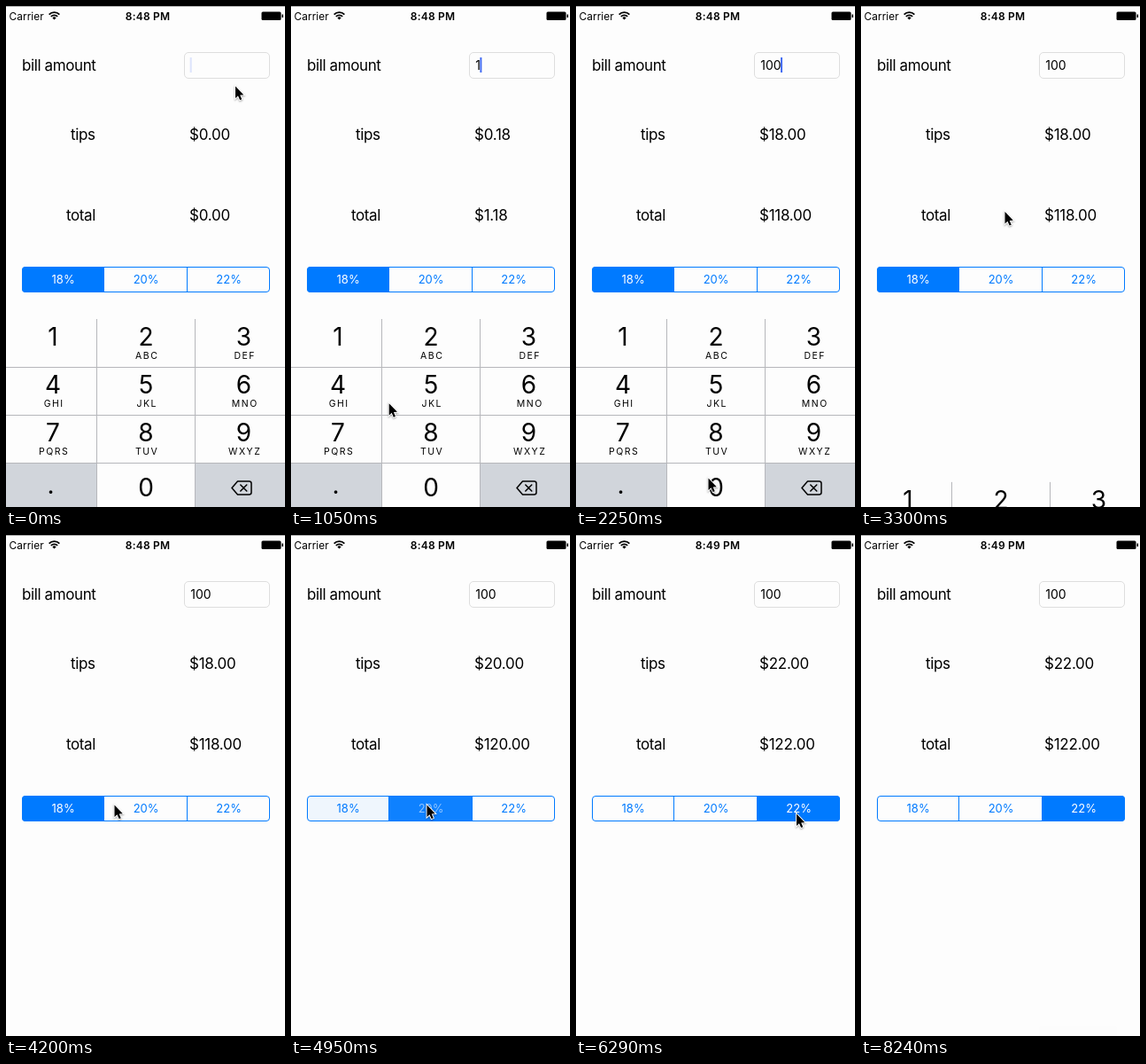
An HTML page with a canvas that plays this animation: 315x565 px, repeating every 8.38 s.

```html
<!DOCTYPE html>
<html lang="en">
<head>
<meta charset="utf-8">
<title>Tip calculator</title>
<style>
  html, body { margin: 0; width: 315px; height: 565px; overflow: hidden; background: #fdfdfd; }
  canvas { display: block; }
</style>
</head>
<body>
<canvas id="stage" width="315" height="565"></canvas>
<script>
const ctx = document.getElementById('stage').getContext('2d');
const LOOP = 8380, STEP = 150;
const PAPER = '#fdfdfd', BLUE = '#007aff', GREY = '#d1d5db';

// Pointer moves: start, end, destination
const MOVES = [
  [0, 750, 80, 382], [900, 1500, 149, 532], [2250, 3000, 162, 231.5], [3300, 4200, 122, 304],
  [4200, 4500, 153, 304], [5100, 5700, 248.5, 314], [6290, 7040, 250.5, 328], [7040, 7490, 262, 600]
];
// Key presses: key, down, up
const PRESSES = [['1', 750, 900], ['0', 1650, 1800], ['0', 2100, 2250]];
// When each segment starts to be selected
const PICKS = [-LOOP, 4650, 5850];
const KEYS = ['1', '2ABC', '3DEF', '4GHI', '5JKL', '6MNO', '7PQRS', '8TUV', '9WXYZ', '.', '0', '<'];
const COLUMNS = [[0, 102, 53], [103, 110, 158], [214, 110, 268.5]];

const ramp = (t, from, to) => Math.min(1, Math.max(0, (t - from) / (to - from)));
const easeOut = (u, power = 2) => 1 - (1 - u) ** power;
const smooth = u => u * u * (3 - 2 * u);

function text(str, x, y, size, { gap = 0, weight = 400, align = 'left', color = '#000' } = {}) {
  ctx.font = `${weight} ${size}px Inter, sans-serif`;
  ctx.letterSpacing = gap + 'px';
  ctx.textAlign = align;
  ctx.fillStyle = color;
  ctx.fillText(str, x, y);
}

function box(color, x, y, w, h) {
  ctx.fillStyle = color;
  ctx.fillRect(x, y, w, h);
}

function round(x, y, w, h, r) {
  ctx.beginPath();
  ctx.roundRect(x, y, w, h, r);
}

function fill(color) {
  ctx.fillStyle = color;
  ctx.fill();
}

function stroke(color, width) {
  ctx.strokeStyle = color;
  ctx.lineWidth = width;
  ctx.stroke();
}

function faded(alpha, paint) {
  ctx.globalAlpha = alpha;
  paint();
  ctx.globalAlpha = 1;
}

function statusBar(t) {
  box('#b0b0b0', 0, 0, 315, 1);
  text('Carrier', 3.5, 15.5, 11.8, { gap: .1 });
  text(t < 5250 ? '8:48 PM' : '8:49 PM', 160, 15.5, 12, { gap: .2, weight: 600, align: 'center' });
  const from = -Math.PI * .75, to = -Math.PI * .25;
  for (const r of [8.3, 5.2]) {
    ctx.beginPath();
    ctx.arc(54.5, 15.5, r, from, to);
    stroke('#000', 1.8);
  }
  ctx.beginPath();
  ctx.moveTo(54.5, 15.5);
  ctx.arc(54.5, 15.5, 3, from, to);
  fill('#000');
  round(288.5, 6.5, 22, 9.5, 1.5);
  fill('#000');
  box('#000', 311.5, 9.5, 1.5, 3.5);
}

function form(t) {
  const bill = PRESSES.filter(p => t >= p[2]).map(p => p[0]).join('');
  const rate = 16 + 2 * PICKS.filter(p => t >= p + 300).length;
  const tip = bill * rate / 100;
  const label = { gap: -.4 }, amount = { gap: -.25 };
  text('bill amount', 18, 73, 17, label);
  text('tips', 73, 151, 17, label);
  text('total', 68, 242, 17, label);
  text('$' + tip.toFixed(2), 207, 151, 17, amount);
  text('$' + (tip + +bill).toFixed(2), 207, 242, 17, amount);

  round(201.5, 52.5, 96, 29, 4.5);
  stroke('#dedede', 1);
  text(bill, 208.2, 72, 14);
  const blink = Math.min(1, ((t - 250) / 600) ** 2) * (1 - ramp(t, 2700, 3000));
  const caret = 207.7 + ctx.measureText(bill).width;
  faded(blink, () => box('#426bf2', caret, 58, 2, 17));
}

function segments(t) {
  const picked = i => i < PICKS.length ? smooth(ramp(t, PICKS[i], PICKS[i] + 350)) : 0;
  ctx.save();
  round(18, 294, 280, 29, 4);
  ctx.clip();
  PICKS.forEach((_, i) => {
    const on = picked(i) - picked(i + 1);
    const x = Math.floor(17.2 + 93.4 * i);
    const label = color => text(18 + 2 * i + '%', 64.6 + 93.5 * i, 313, 13, { align: 'center', color });
    faded(on, () => box(BLUE, x, 294, 94, 29));
    box(BLUE, x, 294, 1, 29);
    label(BLUE);
    faded(on ** 10, () => label('#fff'));
  });
  ctx.restore();
  round(18.5, 294.5, 279, 28, 3.5);
  stroke(BLUE, 1);
}

function backspace() {
  ctx.lineJoin = ctx.lineCap = 'round';
  ctx.beginPath();
  ctx.moveTo(255, 543.5);
  ctx.lineTo(261.5, 536);
  ctx.arcTo(277, 536, 277, 543, 2.5);
  ctx.arcTo(277, 551, 270, 551, 2.5);
  ctx.lineTo(261.5, 551);
  ctx.closePath();
  ctx.moveTo(264.8, 540);
  ctx.lineTo(271.8, 547);
  ctx.moveTo(271.8, 540);
  ctx.lineTo(264.8, 547);
  stroke('#000', 1.5);
}

function keyboard(t) {
  const pressed = PRESSES.find(p => t >= p[1] && t < p[2]);
  ctx.save();
  ctx.translate(0, 216 * easeOut(ramp(t, 3150, 3600), 4.7));
  box(PAPER, 0, 352, 315, 213);
  KEYS.forEach((key, i) => {
    const [x, w, mid] = COLUMNS[i % 3], y = 353 + 54 * Math.floor(i / 3);
    const digit = key[0], drop = { '.': 34.5, '0': 38 }[digit] || 30;
    if ('.<'.includes(key) || (pressed && pressed[0] === digit)) box(GREY, x, y, w, 55);
    if (key === '<') return backspace();
    text(digit, key === '.' ? 50.5 : mid, y + drop, 28, { align: 'center' });
    text(key.slice(1), mid + 1.2, y + 45, 10.5, { gap: 1.5, align: 'center' });
  });
  for (const x of [102, 213]) box('#b6b7bb', x, 353, 1, 220);
  for (const y of [407, 461, 515]) box('#b6b7bb', 0, y, 315, 1);
  ctx.restore();
}

function dockLabel(t) {
  round(201, 554, 88, 24, 3);
  faded(ramp(t, 7340, 7490) - ramp(t, 7940, 8260), () => fill('#e8e8e8'));
}

function pointer(t) {
  let x = 258.5, y = 90;
  for (const [start, end, toX, toY] of MOVES) {
    const u = easeOut(ramp(t, start, end));
    x += (toX - x) * u;
    y += (toY - y) * u;
  }
  ctx.save();
  ctx.translate(x + .5, y + .5);
  ctx.scale(.93, .95);
  ctx.beginPath();
  for (const p of [[0, 0], [0, 14.3], [3.2, 11.3], [5.5, 16.4], [7.8, 15.4], [5.6, 10.4], [10, 10.2]]) ctx.lineTo(...p);
  ctx.closePath();
  ctx.shadowColor = 'rgba(0,0,0,.35)';
  ctx.shadowBlur = 2;
  ctx.shadowOffsetY = 1;
  stroke('#fff', 2);
  ctx.shadowColor = 'transparent';
  fill('#000');
  ctx.restore();
}

// The picture moves in steps; the clock skips 10 ms late in the loop.
function stepped(t) {
  const skip = t < 6290 ? 0 : 10;
  return Math.floor((t + skip) / STEP) * STEP - skip;
}

function draw(now) {
  const t = stepped(now % LOOP);
  box(PAPER, 0, 0, 315, 565);
  statusBar(t);
  form(t);
  segments(t);
  keyboard(t);
  dockLabel(t);
  pointer(t);
  requestAnimationFrame(draw);
}
draw(0);
</script>
</body>
</html>
```
